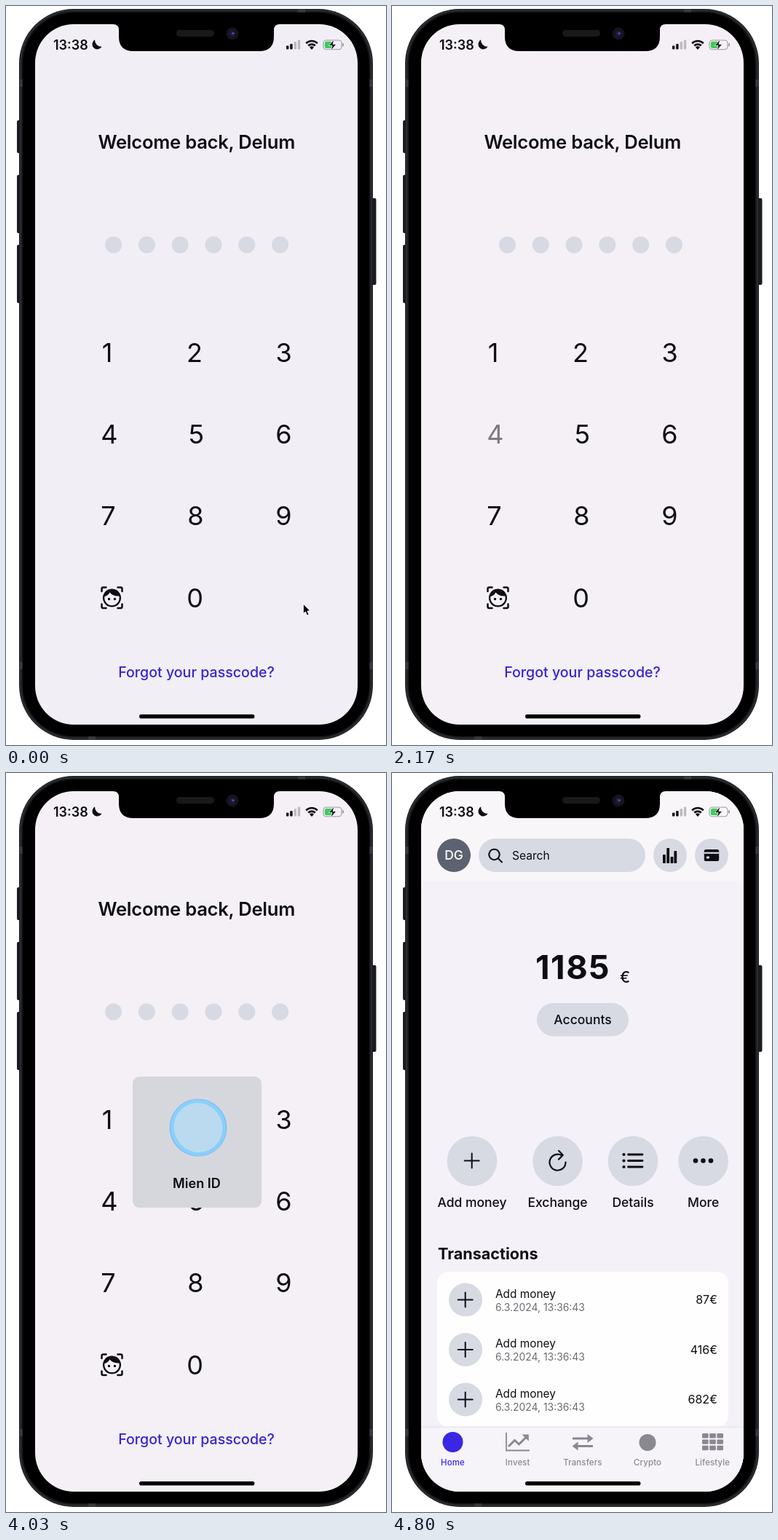
An HTML page for the animation above (6.87 s loop, 522x1015 px).

```html
<!DOCTYPE html>
<html lang="en">
<head>
<meta charset="utf-8">
<title>Passcode login</title>
<style>
  html, body { margin: 0; width: 100%; height: 100%; overflow: hidden; background: #fff; }
  svg { display: block; width: 100%; height: 100%; font-family: Inter, "Liberation Sans", sans-serif; }
  .mid { text-anchor: middle; }
  .end { text-anchor: end; }
  .line { fill: none; stroke: #0d0d12; stroke-width: 2; stroke-linecap: round; stroke-linejoin: round; }
</style>
</head>
<body>
<svg id="stage" viewBox="0 0 522 1015" xmlns="http://www.w3.org/2000/svg"></svg>
<script>
const LOOP = 6870;
const INK = '#0d0d12', GREY = '#8a898f', BLUE = '#3a26e4', DOT = '#d7d9e3';

const rect = (x, y, w, h, r, fill, more = '') =>
  `<rect x="${x}" y="${y}" width="${w}" height="${h}" rx="${r}" fill="${fill}" ${more}/>`;
const disc = (x, y, r, fill, more = '') =>
  `<circle cx="${x}" cy="${y}" r="${r}" fill="${fill}" ${more}/>`;
const line = (d, more = '') => `<path class="line" d="${d}" ${more}/>`;
const wide = w => `style="stroke-width:${w}"`;
const text = (s, x, y, size, weight = 400, cls = '', fill = INK, more = '') =>
  `<text x="${x}" y="${y}" font-size="${size}" font-weight="${weight}" class="${cls}" fill="${fill}" ${more}>${s}</text>`;
const plus = (x, y) => line(`M${x - 10} ${y}h20M${x} ${y - 10}v20`);

function phoneBody() {
  const buttons = [[15, 157, 45], [15, 232, 80], [15, 328, 80], [500, 264, 119]];
  return buttons.map(([x, y, h]) => rect(x, y, 8.5, h, 2, '#1a1b1f')).join('') +
    rect(18, 4, 486, 1004, 75, '#17181b') +
    rect(20, 6, 482, 1000, 73, 'none', 'stroke="#2b2c31" stroke-width="2.4"') +
    [[18.5, 101, 4, 10], [18.5, 901, 4, 10], [499.5, 101, 4, 10], [499.5, 901, 4, 10],
     [401, 4.5, 10, 4], [113, 1003.5, 10, 4]].map(b => rect(...b, 0, '#3a3b41')).join('') +
    rect(23, 9, 476, 994, 70, '#000');
}

function statusBar() {
  const bars = [[385, 5, INK], [390.2, 7.5, INK], [395.6, 10.5, '#bdbbc1'], [400.8, 13, '#bdbbc1']];
  return text('13:38', 65, 60, 18, 600) +
    `<path d="M122 46.3a7 7 0 1 0 9.6 9.4a9 9 0 0 1-9.6-9.4z" fill="${INK}"/>` +
    bars.map(([x, h, c]) => rect(x, 59.5 - h, 3.4, h, 1, c)).join('') +
    line('M412.2 51.2a11.2 11.2 0 0 1 15.6 0M415.2 54.5a7 7 0 0 1 9.6 0', 'style="stroke-width:2.6;stroke-linecap:butt"') +
    `<path d="M420 60l-3-3.2a4.3 4.3 0 0 1 6 0z" fill="${INK}"/>` +
    rect(436, 47, 25, 12.8, 4, 'none', 'stroke="#9b9a9f" stroke-width="1.1"') +
    rect(462.2, 51, 1.8, 4.6, 1, '#9b9a9f') +
    rect(437.8, 48.8, 10, 9.2, 2.2, '#3ecb5c') +
    `<path d="M451 45.5l-7.5 9h4.6l-2.4 7l8-9h-4.7z" fill="${INK}" stroke="#f4f0f6" stroke-width=".8"/>`;
}

function notch() {
  return '<path d="M147 24V25q8 0 8 8V42Q155 62 175 62H348Q368 62 368 42V33q0-8 8-8V24z"/>' +
    rect(234, 33, 52, 9, 4.5, '#19191c') +
    disc(311, 38, 8.5, '#14141c') + disc(311, 38, 4, '#1d1c3c') + disc(312, 37.5, 1.6, '#4d4bb0');
}

function faceIcon() {
  return `<g id="face">` +
    line('M131.5 804v-3.5q0-2 2-2h4M153.5 798.5h4q2 0 2 2v3.5M159.5 821.5v3.5q0 2-2 2h-4M137.5 827h-4q-2 0-2-2v-3.5', wide(2.5)) +
    line('M145.5 801.8a11.3 11.3 0 1 1-.01 0z', wide(2.4)) +
    `<path d="M134.5 811.5q5.5-1.5 8-6q4.5 5.5 13.5 5q-2-9.5-10.5-9.7q-9.5.3-11 10.7z" fill="${INK}"/>` +
    disc(141.5, 814.5, 1.7, INK) + disc(149.5, 814.5, 1.7, INK) + '</g>';
}

function passcode() {
  const xs = { 1: 139, 2: 259, 3: 381.5, 4: 142, 5: 261.5, 6: 381.5, 7: 140.5, 8: 260.5, 9: 381.5 };
  let keys = text(0, 259.5, 825.5, 36, 400, 'mid');
  for (const n in xs)
    keys += text(n, xs[n], 489 + 112.2 * Math.floor((n - 1) / 3), 36, 400, 'mid', INK, `id="key${n}"`);
  let dots = '';
  for (let i = 0; i < 6; i++) dots += disc(147.6 + 45.8 * i, 328, 11.5, DOT, `id="dot${i}"`);
  return `<g id="pass">` + rect(40, 25, 600, 963, 0, '#f4f0f6', 'id="passBg"') +
    text('Welcome back, Delum', 261.7, 196, 25.6, 600, 'mid', INK, 'letter-spacing="-.25"') +
    `<g id="dots">${dots}</g>` + keys + faceIcon() +
    `<g id="back">` +
    line('M368 802.7H386.5q1.8 0 1.8 1.8V821.5q0 1.8-1.8 1.8H368L361 813z', wide(2.4)) +
    line('M371.8 808.3l9.4 9.4M381.2 808.3l-9.4 9.4', wide(2.4)) + '</g>' +
    text('Forgot your passcode?', 261.5, 922, 19.6, 500, 'mid', '#3822d6') + '</g>';
}

function actions() {
  const names = [['Add money', 110], ['Exchange', 227.5], ['Details', 331], ['More', 427.7]];
  const icons = [
    plus(109.7, 532.5),
    line('M233 525.2a11 11 0 1 0 5.5 9.5M229 518.8l5.8 6l-5.8 5.8', wide(2.2)),
    [524, 532.5, 541].map(y => disc(318.5, y, 2.1, INK) + line(`M324.5 ${y}h19.5`, wide(2.8))).join(''),
    [417, 427.5, 438].map(x => disc(x, 532.5, 3.3, INK)).join('')
  ];
  return names.map(([s, x], i) => disc(x, 533, 34.3, DOT) + icons[i] +
    text(s, x, 596, 17.5, 500, 'mid')).join('');
}

function transactions() {
  return text('Transactions', 63, 668, 21.6, 700) + rect(62, 685, 400, 213.5, 16, '#fffefe') +
    ['87€', '416€', '682€'].map((sum, i) => {
      const y = 723.6 + 68.4 * i;
      return disc(101, y, 23, DOT) + plus(100.7, y) +
        text('Add money', 142, y - 2.6, 15.4) +
        text('6.3.2024, 13:36:43', 142, y + 15.2, 13.9, 400, '', '#6c6b72') +
        text(sum, 446.8, y + 5.6, 16, 400, 'end');
    }).join('');
}

function tabs() {
  const grey = w => `style="stroke:${GREY};stroke-width:${w};stroke-linecap:butt;stroke-linejoin:miter"`;
  let grid = '';
  for (let i = 0; i < 9; i++)
    grid += rect(426 + 10.2 * (i % 3), 907 + 8.4 * Math.floor(i / 3), 8.6, 6.4, 1.2, GREY);
  return rect(40, 898, 443, 90, 0, '#f6f3f9') + rect(40, 897.6, 443, 1, 0, '#e2dfe8') +
    disc(83.5, 919, 14, BLUE) +
    line('M157 906v24.5h32', grey(1.8)) +
    line('M160 925l8.5-8.5l6 5.5l11-11', grey(3)) +
    `<path d="M178.500 908.500h9.300v9.300z" fill="${GREY}"/>` +
    line('M248 914h22M276 924.5h-22', grey(2.8)) +
    `<path d="M268.500 908l8 6l-8 6zM255.500 918.500l-8 6l8 6z" fill="${GREY}"/>` +
    disc(351, 919.5, 11.5, GREY) + grid +
    ['Home', 'Invest', 'Transfers', 'Crypto', 'Lifestyle'].map((s, i) =>
      text(s, 83.5 + 89.2 * i, 951, 11.4, 500, 'mid', i ? GREY : BLUE, 'letter-spacing=".15"')).join('');
}

function home() {
  const chart = [[372, 112], [377.3, 103], [382.6, 115], [387.4, 107]];
  return `<g id="home">` + rect(40, 25, 443, 963, 0, '#f4f1f8') + rect(40, 25, 443, 123, 0, '#f9f6fa') +
    disc(85, 113, 23, '#5c6270') + text('DG', 85, 119.2, 17.5, 500, 'mid', '#fff') +
    rect(119, 90, 229, 46, 23, DOT) +
    line('M140.5 104.8a7.2 7.2 0 1 1-.01 0zM146 117.5l5 5') +
    text('Search', 165, 118.6, 15.6) +
    disc(382, 113, 23, DOT) + chart.map(([x, y]) => rect(x, y, 3.8, 124 - y, .8, INK)).join('') +
    disc(439, 113, 23, DOT) + rect(428.8, 105, 20.4, 16, 2.6, INK) +
    rect(428.8, 108.7, 20.4, 2.2, 0, DOT) + rect(432, 114.5, 4, 3, .8, DOT) +
    text('1185', 197, 283, 45.4, 700, '', INK, 'letter-spacing="1.5"') + text('€', 313, 287.5, 21, 500) +
    rect(199, 316, 126, 45.5, 22.7, DOT) + text('Accounts', 262, 345.2, 17.5, 500, 'mid') +
    actions() + transactions() + tabs() + '</g>';
}

function dialog() {
  return `<g id="dialog">` + rect(174, 417, 177, 180, 9, '#d6d7dc') +
    `<g fill="none" stroke-width="4.4">` +
    `<circle id="ring" r="37.3" cy="487"/>` +
    `<ellipse id="orbitA" rx="36" stroke="#7fe2fa" stroke-width="4" fill="#a9e2fb" fill-opacity=".5"/>` +
    `<ellipse id="orbitB" rx="36" stroke="#8ccdfb" stroke-width="3"/>` +
    `<path id="check" d="M244 488l12 12l22-25" stroke="#fff" stroke-linecap="round" stroke-linejoin="round" pathLength="1"/></g>` +
    text('Mien ID', 262, 569.6, 18.1, 600, 'mid') + '</g>';
}

const stage = document.getElementById('stage');
stage.innerHTML =
  '<clipPath id="screen"><rect x="40" y="25" width="443" height="962" rx="53"/></clipPath>' +
  phoneBody() + '<g clip-path="url(#screen)">' + passcode() +
  rect(40, 25, 443, 963, 0, '#000', 'id="dim"') + home() + dialog() +
  statusBar() + notch() + rect(183, 973, 158.5, 5.6, 2.8, '#000') + '</g>' +
  `<path id="cursor" d="M408.3 821v13.8l3-2.8l2.2 5l2.6-1.1l-2.2-4.9h4.2z" fill="#000" stroke="#fff" stroke-width="1"/>`;

const el = {};
stage.querySelectorAll('[id]').forEach(n => el[n.id] = n);
const set = (id, attrs) => { for (const k in attrs) el[id].setAttribute(k, attrs[k]); };
const slide = (id, x) => set(id, { transform: `translate(${x.toFixed(2)} 0)` });

const clamp = x => Math.max(0, Math.min(1, x));
const span = (t, a, b) => clamp((t - a) / (b - a));
const ease = x => x < .5 ? 2 * x * x : 1 - 2 * (1 - x) * (1 - x);
const mix = (a, b, x) => a + (b - a) * x;
const blend = (a, b, x) => `rgb(${a.map((c, i) => Math.round(mix(c, b[i], x)))})`;

// Runs [start, target, duration] tweens; a later one takes over from where it is.
function tween(steps, from, t) {
  let v = from;
  for (let i = 0; i < steps.length && t >= steps[i][0]; i++) {
    const [start, to, dur] = steps[i];
    const until = i + 1 < steps.length ? Math.min(t, steps[i + 1][0]) : t;
    v = mix(v, to, ease(span(until, start, start + dur)));
  }
  return v;
}

const taps = Array.from({ length: 6 }, (_, i) => 648 + 282.5 * i);
const keyFade = taps.flatMap(r => [[r - 148, .2, 148], [r, 1, 250]]);
const SHAKE = 2078;
const shake = [[SHAKE, -20, 40],
  ...[20, -20, 20, -20].map((x, i) => [SHAKE + 40 + 80 * i, x, 80]), [SHAKE + 360, 0, 40]];
const faceFade = [[3445, 1, 250]];

// Critically damped push of the next screen.
function push(t) {
  const u = Math.max(0, t - 4069.5) * .01685;
  return t >= 4800 ? 1 : 1 - (1 + u) * Math.exp(-u);
}

function drawDialog(t) {
  const shown = ease(span(t, 3560, 3700)) * (1 - ease(span(t, 4610, 4780)));
  const s = mix(1.12, 1, ease(span(t, 3560, 3720)));
  set('dialog', { opacity: shown, transform: `translate(262 507) scale(${s}) translate(-262 -507)` });
  const white = span(t, 4270, 4380);
  const cx = mix(264, 261, white);
  set('ring', {
    cx, stroke: blend([138, 190, 250], [255, 255, 255], white),
    fill: '#b9cdf2', 'fill-opacity': .35 * (1 - white)
  });
  const turn = (t - 4200) * .0096;
  const orbit = (id, phase, tilt) => set(id, {
    ry: 36 * Math.abs(Math.cos(turn + phase)), opacity: 1 - white,
    transform: `translate(${cx} 487) rotate(${tilt})`
  });
  orbit('orbitA', 1.41, 67);
  orbit('orbitB', 1.35, 63);
  const drawn = ease(span(t, 4420, 4550));
  set('check', { 'stroke-dasharray': `${drawn} 2`, opacity: drawn > 0 ? 1 : 0 });
}

function render(t) {
  set('passBg', { fill: blend([241, 239, 245], [244, 240, 246], span(t, 30, 130)) });
  set('cursor', { opacity: t < 60 ? 1 : 0 });

  const k = t >= 970 && t < 1070 ? 970 : t;
  const typed = k < SHAKE - 8 ? taps.filter(r => k >= r).length : 0;
  for (let i = 0; i < 6; i++) set('dot' + i, { fill: i < typed ? BLUE : DOT });
  set('back', { opacity: typed ? 1 : 0 });
  set('key4', { opacity: tween(keyFade, 1, k) });
  slide('dots', tween(shake, 0, t));
  set('face', { opacity: t < 3430 ? 1 : tween(faceFade, .24, t) });

  const p = push(t);
  slide('pass', -133 * p);
  slide('home', 443 * (1 - p));
  set('dim', { opacity: .11 * p });
  drawDialog(t);
}

function tick() {
  render(performance.now() % LOOP);
  requestAnimationFrame(tick);
}
tick();
</script>
</body>
</html>
```
